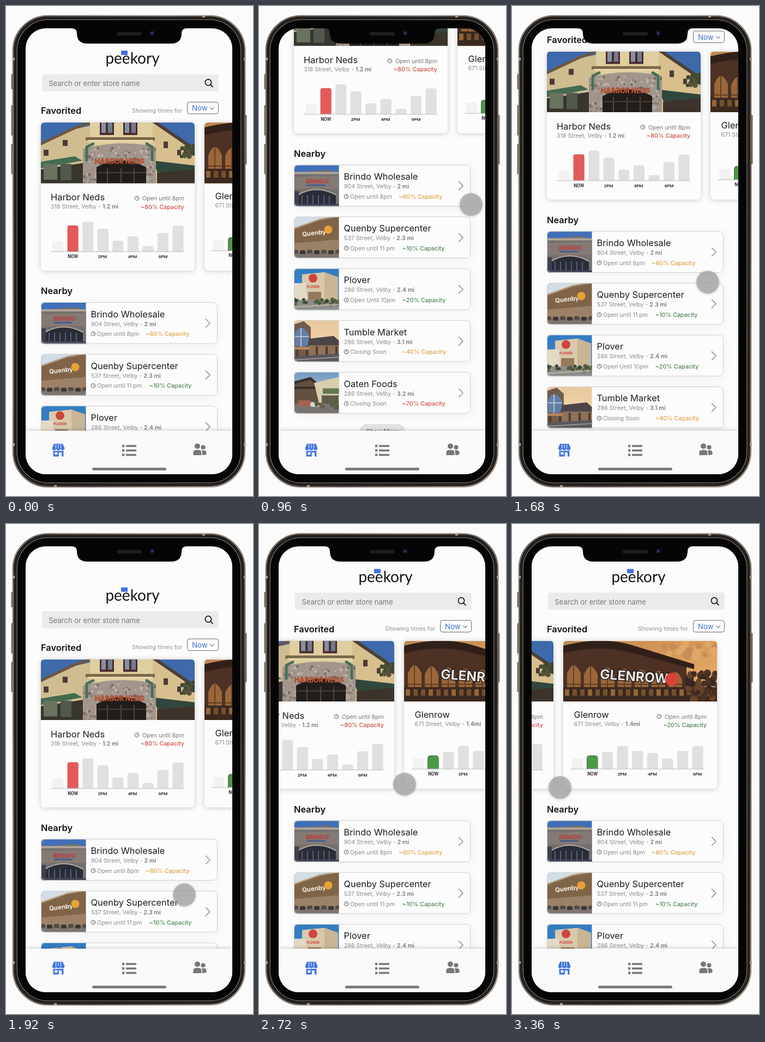
An HTML page for the animation above (3440 ms loop, 453x900 px).

```html
<!DOCTYPE html>
<html lang="en">
<head>
<meta charset="utf-8">
<title>Store finder</title>
<style>
html, body { margin: 0; width: 100%; height: 100%; overflow: hidden; background: #fbfbfb; }
svg { display: block; width: 453px; height: 900px; }
text { font-family: Inter, sans-serif; white-space: pre; }
.axis { font-family: Roboto, sans-serif; font-weight: 500; }
.card { fill: #fcfcfc; filter: drop-shadow(0 1px 5px #0003); }
.row { fill: #fcfcfc; filter: drop-shadow(3px 3px 8px #0000000c); }
.line { fill: none; stroke-linecap: round; stroke-linejoin: round; }
</style>
</head>
<body>
<svg id="stage" viewBox="0 0 453 900"></svg>
<script>
const RED = '#cf4b45', ORANGE = '#dfa044', GREEN = '#4c8350', INK = '#1d1d1f', GREY = '#8b8b8b';

const rect = (x, y, w, h, fill, r = 0, more = '') =>
  `<rect x="${x}" y="${y}" width="${w}" height="${h}" rx="${r}" fill="${fill}" ${more}/>`;
const poly = (points, fill) => `<polygon points="${points}" fill="${fill}"/>`;
const path = (d, fill, more = '') => `<path d="${d}" fill="${fill}" ${more}/>`;
const line = (d, color, width) => `<path class="line" d="${d}" stroke="${color}" stroke-width="${width}"/>`;
const disc = (x, y, r, fill, more = '') => `<circle cx="${x}" cy="${y}" r="${r}" fill="${fill}" ${more}/>`;
const text = (x, y, size, fill, str, weight = 400, more = '') =>
  `<text x="${x}" y="${y}" font-size="${size}" fill="${fill}" font-weight="${weight}" ${more}>${str}</text>`;
const at = (x, y, body, more = '') => `<g transform="translate(${x} ${y})" ${more}>${body}</g>`;
const repeat = (n, fn) => Array.from({ length: n }, (_, i) => fn(i)).join('');
const END = 'text-anchor="end"', MID = 'text-anchor="middle"';

let seed = 7;
const rand = (a, b) => a + (b - a) * ((seed = seed * 16807 % 2147483647) / 2147483647);
const speckle = (n, x0, y0, x1, y1, colors, r) => repeat(n, i =>
  disc(rand(x0, x1).toFixed(1), rand(y0, y1).toFixed(1), rand(r / 2, r).toFixed(1), colors[i % colors.length]));

const clock = (x, y) => disc(x, y, 3.7, 'none', 'stroke="#666" stroke-width="1.1"') +
  line(`M${x} ${y - 2}V${y}H${x + 1.6}`, '#666', .9);
const address = (x, y, street, miles) => text(x, y, 10.6, GREY,
  `${street} - <tspan font-weight="600" fill="#777">${miles}</tspan>`);

// Shop pictures, as flat shapes
const cornerShop =
  rect(0, 0, 282, 112, '#3e69aa') +
  poly('0,42 62,12 108,2 108,112 0,112', '#cfbd91') +
  line('M0 39L62 10L92 0', '#6c5740', 5) +
  poly('0,72 62,62 76,70 0,84', '#446b50') + poly('0,86 80,74 80,112 0,112', '#38352e') +
  rect(5, 76, 25, 29, '#69735f') + rect(36, 76, 20, 30, '#52584d') +
  [[5, 50], [40, 32]].map(([x, y]) => rect(x, y, 9, 11, '#4d3a36')).join('') +
  poly('202,0 208,0 282,49 282,112 202,112', '#d7c08e') +
  line('M204 -4L284 51', '#4b4037', 6) +
  rect(225, 35, 8, 12, '#4d3a36') + rect(250, 50, 7, 10, '#4d3a36') +
  poly('205,70 282,79 282,88 214,92', '#31473c') + poly('213,92 282,86 282,112 213,112', '#3c342c') +
  speckle(24, 258, 41, 282, 64, ['#394a34', '#575238'], 5) +
  rect(90, 0, 115, 47, '#dfce9f') +
  [108, 151].map(x => rect(x, -3, 26, 26, '#492c30') +
    rect(x + 3, 0, 8, 19, '#8590a0') + rect(x + 15, 0, 8, 19, '#717c8d')).join('') +
  rect(82, 27, 127, 6, '#786848') + rect(86, 32, 119, 3, '#eadab0') +
  path('M77 112V48Q145 30 211 45V112Z', '#a2958b') +
  speckle(170, 79, 46, 210, 110, ['#c1b2a5', '#8b7a71', '#766c66', '#ada69e'], 3) +
  path('M102 112V82Q147 57 193 82V112Z', '#211d1b') +
  [121, 146, 170].map(x => rect(x, 84, 2, 28, '#51473d')).join('') + rect(104, 91, 88, 2, '#4c4038') +
  line('M84 69V45L96 39M204 69V45L194 39', '#477058', 5) +
  text(144, 76, 12.5, '#cf5a35', 'HARBOR NEDS', 800, MID + ' stroke="#713723" stroke-width=".4"');

const archShop =
  rect(0, 0, 283, 112, 'url(#dusk)') +
  speckle(16, 180, 4, 282, 30, ['#c68c59', '#e0a867'], 9) +
  path('M0 112V14Q45 0 105 12L226 41V112Z', '#4d3124') +
  path('M0 9Q70 -9 126 8L240 43V52L125 22Q66 6 0 23Z', '#302019') +
  repeat(7, i => {
    const x = 7 + i * 31, y = 45 + i * 2;
    return path(`M${x} 104V${y + 15}Q${x + 12} ${y - 15} ${x + 25} ${y + 15}V104Z`, '#9b6739') +
      line(`M${x + 12} ${y + 2}V104M${x} 80H${x + 25}`, '#5b3a27', 1.8);
  }) +
  rect(0, 85, 283, 27, '#3b281f') +
  repeat(20, i => rect(i * 14 + 3, 89, 8, 12, i % 3 ? '#75502f' : '#946637')) +
  speckle(70, 228, 58, 283, 109, ['#4b3124', '#684329', '#382720'], 7) +
  `<g transform="rotate(4 130 65)">` +
  text(130, 74, 24.5, '#eae7e2', 'GLENROW', 700, MID + ' stroke="#211b1b" stroke-width="3" paint-order="stroke"') +
  `</g>` + disc(199, 71, 12, '#d84339');

const thumbs = [
  rect(0, 0, 83, 77, '#416fb8') + poly('0,14 64,9 83,17 83,77 0,77', '#75706e') +
  rect(0, 13, 83, 4, '#b0a598') + poly('0,22 83,20 83,44 0,44', '#847a75') +
  text(43, 34, 11, '#b34243', 'BRINDO', 800, MID + ' font-style="italic"') +
  rect(24, 36, 34, 3, '#465d88') + path('M9 77V56Q41 34 77 56V77Z', '#292d38') +
  line('M8 55Q41 36 77 55', '#b5aaa0', 2) + rect(0, 48, 9, 29, '#3e4050') +
  repeat(6, i => rect(14 + i * 10, 56, 2, 21, '#5a5f6d')) + rect(0, 72, 83, 5, '#45475b'),

  rect(0, 0, 83, 77, '#d3dde5') + poly('0,23 48,6 83,0 83,65 0,68', '#806448') +
  line('M0 22L48 5L83 -1', '#b39a79', 2.5) + poly('0,49 83,42 83,66 0,68', '#9b8167') +
  text(37, 34, 11.5, '#f4eee4', 'Quenby', 700, MID + ' transform="rotate(-7 37 31)"') +
  disc(63, 24, 7.5, '#e7a238') + rect(0, 65, 83, 12, '#7e746d') +
  repeat(7, i => rect(i * 13 - 2, 61 + i % 2, 10, 7, i % 2 ? '#393637' : '#554b45', 2)),

  rect(0, 0, 83, 77, '#347dc2') + speckle(12, 0, 18, 83, 45, ['#bad2e6', '#85b2d9'], 8) +
  poly('15,11 56,7 81,16 81,59 15,61', '#d9c9ac') + poly('56,7 81,16 81,59 56,57', '#c8b695') +
  rect(0, 27, 23, 32, '#e3d9c7') + disc(35, 18, 8, '#cd453d') +
  text(35, 36, 6, '#cc473e', 'PLOVER', 800, MID) +
  rect(26, 43, 24, 16, '#96795c') + rect(0, 58, 83, 19, '#8d8d8c') +
  speckle(24, 0, 57, 83, 66, ['#49613e', '#695d43', '#344830'], 4) + line('M0 71L83 66', '#c1b69f', 2),

  rect(0, 0, 83, 77, 'url(#sunset)') + poly('0,8 18,2 31,13 31,68 0,68', '#725b4d') +
  path('M2 48V24Q13 4 27 25V48Z', '#617ea8') + line('M13 15V48M3 30H27', '#c5c9cf', 1.8) +
  poly('28,34 73,29 83,38 83,47 25,47', '#4c4548') + rect(28, 46, 55, 20, '#8e7157') +
  repeat(5, i => rect(4 + i * 18, 48, 4, 20, '#513a31')) + rect(0, 49, 29, 5, '#b48460') +
  poly('0,67 83,61 83,77 0,77', '#57585d') + line('M0 73L83 68', '#999393', 2),

  rect(0, 0, 83, 77, 'url(#haze)') + poly('0,17 31,9 53,28 53,63 0,63', '#625042') +
  line('M0 20L30 12L53 31M0 29H48', '#352c28', 4) + poly('37,20 83,9 83,58 46,57', '#d8cdae') +
  rect(53, 30, 30, 10, '#657951') + rect(51, 43, 31, 16, '#615d4d') + rect(0, 58, 83, 19, '#767371') +
  rect(7, 52, 25, 11, '#a26451', 4) + rect(30, 55, 18, 9, '#d6d3cc', 4) +
  speckle(18, 36, 54, 82, 67, ['#486044', '#695d47'], 4)
];

const bars = (heights, color) =>
  heights.map((h, i) => path(`M${21 + i * 27.55} 237v${4 - h}q0 -4 4 -4h12.2q4 0 4 4v${h - 4}z`,
    i == 0 ? '#f2f2f2' : i == 1 ? color : '#e0e0e0')).join('') +
  line('M18.5 237.3H263', '#aaa', .8);

const favorite = (x, id, photo, title, street, miles, cap, color, dx, dy, chart) => at(x, 214,
  rect(0, 0, 282, 272, '#fcfcfc', 7, 'class="card"') +
  `<g clip-path="url(#photo)">${photo}</g>` +
  text(18 + dx, 143 + dy, 16.4, INK, title) + address(18 + dx, 158 + dy, street, miles) +
  clock(176, 139) + text(263, 143, 10.7, '#777', 'Open until 8pm', 400, END) +
  text(263, 158.5, 10.7, color, cap, 500, END) + chart);

const axis = labels => labels.map(([x, s]) =>
  text(x, 249, s == 'NOW' ? 8.2 : 8, '#111', s, s == 'NOW' ? 700 : 500, MID + ' class="axis"')).join('');

const row = (i, title, street, miles, open, cap, color) => at(64, 544 + i * 95.15,
  rect(0, 0, 324, 76.5, '#fcfcfc', 8, 'class="row"') +
  `<g clip-path="url(#thumb)">${thumbs[i]}</g>` +
  rect(.5, .5, 323, 75.5, 'none', 8, 'stroke="#cecece"') +
  text(91.5, 27.5, 16.4, INK, title) + address(92, 43.5, street, miles) +
  clock(96, 58) + text(103, 62, 10.7, GREY, open) +
  text(i ? 199 : 192.5, 62, 10.7, color, cap, 500) + line('M302.5 31L310 38.5L302.5 46', '#999', 1.7));

const header =
  text(232, 106, 28, '#15151a', 'peekory', 400, MID + ' style="font-family:Lato,sans-serif"') +
  rect(211, 82, 12, 8, '#3f74df') +
  rect(66, 125.5, 324, 31.5, '#ebebeb', 4) + text(78.5, 147, 13, '#777', 'Search or enter store name') +
  disc(371, 140.3, 5.6, 'none', 'stroke="#111" stroke-width="1.7"') + line('M375.3 144.6L379 148.3', '#111', 1.8) +
  text(64, 198.3, 16.4, '#111', 'Favorited', 600) + text(323, 195.5, 10.8, '#929292', 'Showing times for', 400, END) +
  rect(332.5, 176.5, 57, 21.5, '#fcfcfc', 4, 'stroke="#626875"') +
  text(341, 192, 13.3, '#3e72d3', 'Now') + line('M374.5 186.5L378 190L381.5 186.5', '#888', 1.2);

const favorites =
  favorite(64, 1, cornerShop, 'Harbor Neds', '318 Street, Velby', '1.2 mi', '~80% Capacity', RED, 0, 0,
    bars([19, 48, 55, 42, 20, 28, 10, 34, 47.5], '#e25b5b') +
    axis([[58.5, 'NOW'], [113, '2PM'], [168, '4PM'], [224, '6PM']])) +
  favorite(364, 2, archShop, 'Glenrow', '671 Street, Velby', '1.4mi', '~20% Capacity', GREEN, 1.5, -2,
    at(-5, -1.7, bars([19.5, 24, 31, 42, 33, 29, 19, 33, 42], '#4c9a49') +
    line('M48.8 237V217q0 -4 4 -4h12', '#2f5930', 1) +
    axis([[58.5, 'NOW'], [113, '2PM'], [168.5, '4PM'], [251, '6PM']])));

const nearby =
  text(64, 529.3, 16.4, '#111', 'Nearby', 600) +
  row(0, 'Brindo Wholesale', '904 Street, Velby', '2 mi', 'Open until 8pm', '~60% Capacity', ORANGE) +
  row(1, 'Quenby Supercenter', '537 Street, Velby', '2.3 mi', 'Open until 11 pm', '~10% Capacity', GREEN) +
  row(2, 'Plover', '286 Street, Velby', '2.4 mi', 'Open Until 10pm', '~20% Capacity', GREEN) +
  row(3, 'Tumble Market', '286 Street, Velby', '3.1 mi', 'Closing Soon', '~40% Capacity', ORANGE) +
  row(4, 'Oaten Foods', '286 Street, Velby', '3.2 mi', 'Closing Soon', '~70% Capacity', RED) +
  rect(185, 1020, 82.5, 26, '#e2e2e2', 13) + text(226, 1037, 10.8, '#666', 'Show More', 500, MID);

const nav =
  rect(36, 780, 380, 82, '#fafafa', 0, 'style="filter:drop-shadow(0 -1px 3px #0003)"') +
  path('M88 804H104L107.5 812Q107 816 103.8 816Q101 816 100 813.5Q99 816 96 816Q93 816 92 813.5Q91 816 88 816Q85 816 84.7 812Z', '#4479df') +
  path('M86.5 817H105.5V827.5H102V820H97V827.5H86.5ZM89.5 819.5V824H94.5V819.5Z', '#4479df', 'fill-rule="evenodd"') +
  line('M91.5 805V812M96 805V812M100.5 805V812', '#fafafa', 1) +
  repeat(3, i => rect(213, 806 + i * 8.2, 4.3, 4.3, '#777') + rect(220, 806.4 + i * 8.2, 19, 3.5, '#777')) +
  disc(351, 808.5, 5, '#777') + disc(361.5, 810.5, 4, '#777') +
  path('M343.5 825V820Q343.5 815.5 349 815.5H353Q358.5 815.5 358.5 820V825Z', '#777') +
  path('M360 825V820Q360 817.5 358.5 816H362.5Q367.5 816.5 367.5 820V824Z', '#777') +
  rect(158, 848, 136, 5, '#7b7b7b', 2.5);

const phone =
  [[125, 28], [182, 56], [253, 56]].map(([y, h]) => rect(9.5, y, 5, h, '#75695f', 1.5)).join('') +
  rect(436, 200, 5.5, 91, '#75695f', 1.5) +
  rect(13, 18, 425, 865, '#171514', 64, 'stroke="url(#metal)" stroke-width="2.6"') +
  rect(17, 22, 417, 857, '#000', 60, 'stroke="#302c29" stroke-width="2"') +
  rect(20, 25, 411, 851, '#050505', 57, 'stroke="#77716c" stroke-width="1.6"') +
  [[12, 95], [12, 803], [436, 95], [436, 803]].map(([x, y]) => rect(x, y, 4, 5, '#a99d91')).join('') +
  rect(360, 17, 5, 4, '#a99d91') + rect(88, 880, 5, 4, '#a99d91');

const notch =
  path('M120 40H332V41Q322 41 322 50Q322 69 303 69H149Q130 69 130 50Q130 41 120 41Z', '#050505') +
  rect(203, 47.5, 46, 7, '#1d1d1e', 3.5) + disc(268, 50, 5, '#13151d') + disc(268, 50, 2.2, '#263f78');

const gradient = (id, dir, ...stops) => `<linearGradient id="${id}" ${dir}>` + stops.map((c, i) =>
  `<stop offset="${i / (stops.length - 1)}" stop-color="${c}"/>`).join('') + '</linearGradient>';
const DOWN = 'x2="0" y2="1"';

const stage = document.getElementById('stage');
stage.innerHTML = `<defs>
  ${gradient('metal', 'x2="1" y2="1"', '#756a60', '#a09488', '#665b52', '#a99b8d')}
  ${gradient('dusk', 'x2="1" y2="1"', '#bd8754', '#d99b58', '#e6b678')}
  ${gradient('sunset', DOWN, '#e8c99e', '#efd1a5', '#d9a37f')}
  ${gradient('haze', DOWN, '#729ac2', '#dce0dc')}
  <clipPath id="screen">${rect(36, 41, 379, 819, '#fff', 37)}</clipPath>
  <clipPath id="photo">${path('M0 111.5V7Q0 0 7 0H275Q282 0 282 7V111.5Z', '#fff')}</clipPath>
  <clipPath id="thumb">${path('M82.5 0V76.5H8Q0 76.5 0 68.5V8Q0 0 8 0Z', '#fff')}</clipPath>
  </defs>${phone}
  <g clip-path="url(#screen)">${rect(36, 41, 379, 819, '#fcfcfc')}
  <g id="page">${header}<g id="strip">${favorites}</g>${nearby}</g>${nav}</g>${notch}
  <g id="touch">${disc(0, 0, 21, '#a6a6a6', 'fill-opacity=".72" style="filter:drop-shadow(0 1px 2px #0004)"')}</g>`;

// Smooth curve through [time, value] keys, resting at turning points
function curve(keys, t) {
  const last = keys.length - 1;
  if (t >= keys[last][0]) return keys[last][1];
  const i = keys.findIndex(k => k[0] > t) - 1;
  const grade = j => (keys[j + 1][1] - keys[j][1]) / (keys[j + 1][0] - keys[j][0]);
  const slope = j => {
    if (j == 0 || j == last) return 0;
    const a = grade(j - 1), b = grade(j);
    return a * b > 0 ? 2 * a * b / (a + b) : 0;
  };
  const [t0, a] = keys[i], [t1, b] = keys[i + 1], d = t1 - t0, u = (t - t0) / d;
  return a + (b - a) * u * u * (3 - 2 * u) +
    d * u * (1 - u) * (slope(i) * (1 - u) - slope(i + 1) * u);
}

const scrollY = [[0, 0], [320, 0], [640, -103], [1120, -290], [1440, -294], [1920, 34.5], [2000, 35], [2320, 2.5], [2560, .5]];
const scrollX = [[0, 0], [2400, 0], [3040, -227], [3360, -270]];
const touchX = [[0, 384], [640, 387], [1440, 391], [1920, 327], [2320, 392], [3040, 140], [3360, 88]];
const touchY = [[0, 597], [320, 597], [640, 494], [1200, 312], [1440, 323], [1920, 681], [2320, 496], [3040, 473], [3360, 484]];
const touchAlpha = [[0, 0], [160, 0], [320, 1]];

const [page, strip, touch] = ['page', 'strip', 'touch'].map(id => document.getElementById(id));
const move = (el, x, y) => el.setAttribute('transform', `translate(${x} ${y})`);

function draw() {
  const t = Math.floor(performance.now() % 3440 / 80) * 80;
  move(page, 0, curve(scrollY, t));
  move(strip, curve(scrollX, t), 0);
  move(touch, curve(touchX, t), curve(touchY, t));
  touch.setAttribute('opacity', curve(touchAlpha, t));
  requestAnimationFrame(draw);
}
draw();
</script>
</body>
</html>
```
